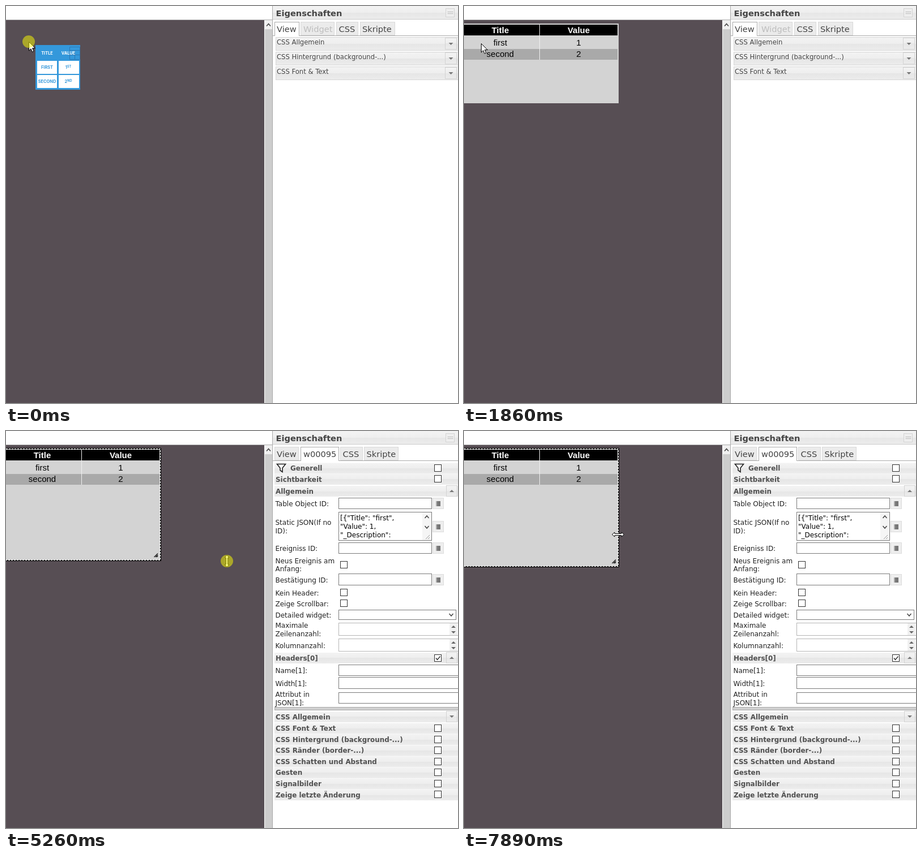
Recreate the animation shown at these times as an HTML page. Size 798 by 702 pixels, loop 8000 ms.

```html
<!DOCTYPE html>
<html lang="de">
<head>
<meta charset="utf-8">
<style>
  html, body { margin: 0; width: 100%; height: 100%; overflow: hidden; background: #fff; }
  svg { display: block; width: 798px; height: 702px; }
  text { white-space: pre; }
  .ui { font: 12px "DejaVu Sans", sans-serif; fill: #222; }
  .code { font: 12px "DejaVu Sans", sans-serif; fill: #000; }
  .bar { font: 11.6px "DejaVu Sans", sans-serif; fill: #444; }
  .bold { font: bold 11.9px "DejaVu Sans", sans-serif; fill: #505050; }
  .tab { font: 14.6px "DejaVu Sans", sans-serif; fill: #444; }
  .title { font: bold 14.6px "DejaVu Sans", sans-serif; fill: #444; }
  .cell { font: 15px "Liberation Sans", sans-serif; text-anchor: middle; }
  .icon { font: 700 7.4px Inter, sans-serif; text-anchor: middle; }
  .tag { font: 9px "Liberation Sans", sans-serif; }
</style>
</head>
<body>
<svg id="stage" viewBox="0 0 798 702"></svg>
<script>
const LOOP = 8000;
const stage = document.getElementById('stage');

const rect = (x, y, w, h, fill, stroke) => stroke
  ? `<rect x="${x + .5}" y="${y + .5}" width="${w - 1}" height="${h - 1}" fill="${fill}" stroke="${stroke}"/>`
  : `<rect x="${x}" y="${y}" width="${w}" height="${h}" fill="${fill}"/>`;
const text = (x, y, cls, str, extra = '') => `<text x="${x}" y="${y}" class="${cls}" ${extra}>${str}</text>`;
const path = (d, stroke, width = 1, fill = 'none', extra = '') =>
  `<path d="${d}" stroke="${stroke}" stroke-width="${width}" fill="${fill}" ${extra}/>`;
const group = (id, body) => `<g id="${id}">${body}</g>`;
const rows = (list, draw) => list.map(draw).join('');

const arrowButton = (y, up) => rect(777, y, 20, 20, 'url(#glass)', '#d3d3d3') +
  path(up ? `M783 ${y + 12}h8l-4 -4z` : `M783 ${y + 8}h8l-4 4z`, 'none', 0, '#777');
const checkbox = (x, y, on) => rect(x, y, 13, 13, '#fff', '#333') +
  (on ? path(`M${x + 3} ${y + 6.5}l2.5 3 5 -6`, '#222', 1.3) : '');
const pickButton = y => rect(753, y, 20, 20, '#eee', '#ddd') + rect(759, y + 6, 8, 9, '#777') +
  rect(759, y + 6, 2, 9, '#aaa');
const chevron = (x, y, dy) => path(`M${x - 3.5} ${y - dy}l3.5 ${2 * dy}l3.5 ${-2 * dy}`, '#444', 1.5);

function tabs(list) {
  return rect(471, 52, 327, 1, '#aaa') + rows(list, ([x, w, textX, label, state]) => {
    const active = state === 'active';
    return rect(x, 28, w, active ? 25 : 24, active ? '#fff' : '#ebebeb', active ? '#aaa' : '#d9d9d9') +
      (active ? rect(x + 1, 51, w - 2, 2, '#fff') : '') +
      text(textX, 45.5, 'tab', label, state === 'off' ? 'style="fill:#bdbdbd"' : '');
  });
}

function viewPanel() {
  const bars = ['CSS Allgemein', 'CSS Hintergrund (background-...)', 'CSS Font &amp; Text'];
  return tabs([[474, 44, 478, 'View', 'active'], [520, 60, 525, 'Widget', 'off'],
      [583, 39, 587.5, 'CSS'], [625, 62, 629, 'Skripte']]) +
    rows(bars, (label, i) => {
      const y = 55 + 26 * i;
      return rect(476, y, 324, 24, 'url(#glass)', '#d6d6d6') + text(478, y + 13, 'bar', label) +
        rect(775, y + 1, 21, 21, 'url(#glass)', '#d3d3d3') +
        path(`M781.5 ${y + 10}h8l-4 4z`, 'none', 0, '#777');
    });
}

function widgetPanel() {
  const header = (y, label, x = 476) => rect(474, y - 9, 324, 19, 'url(#glass)') + text(x, y + 4.5, 'bold', label);
  const label = (y, str) => text(475.5, y + 4.5, 'ui', str);
  const input = (y, h = 20, w = 165) => rect(587, y, w, h, '#fff', '#7a7a7a');
  const spinner = y => rect(587, y, 212, 23, '#fff', '#b5b5b5') + rect(783, y + 1, 14, 21, '#f0f0f0') +
    path(`M786 ${y + 9}h8l-4 -4z M786 ${y + 15}h8l-4 4z`, 'none', 0, '#666');
  const closed = ['CSS Font &amp; Text', 'CSS Hintergrund (background-...)', 'CSS Ränder (border-...)',
    'CSS Schatten und Abstand', 'Gesten', 'Signalbilder', 'Zeige letzte Änderung'];

  return tabs([[474, 43, 478, 'View'], [520, 68, 525, 'w00095', 'active'],
      [590, 40, 594.5, 'CSS'], [632, 61, 636.5, 'Skripte']]) +
    header(65.5, 'Generell', 502) + path('M478.5 58.5h15l-5.5 7v7l-4 -3v-4z', '#222', 1.6, '#fff') +
    header(85, 'Sichtbarkeit') + header(106, 'Allgemein') + arrowButton(96, true) +
    checkbox(756, 59) + checkbox(756, 78) +
    label(128, 'Table Object ID:') + input(118) + pickButton(118) +
    label(161, 'Static JSON(If no') + label(176, 'ID):') + input(143, 51) + pickButton(159) +
    rows(['[{"Title": "first",', '"Value": 1,', '"_Description":'], (s, i) => text(590, 158 + 15 * i, 'code', s)) +
    rect(735, 144, 16, 49, '#f5f5f5') + chevron(743, 152, -2) + chevron(743, 170, 2) +
    path('M741 191l7 -7M745 191l3 -3', '#999') +
    label(207, 'Ereigniss ID:') + input(197) + pickButton(197) +
    label(229, 'Neus Ereignis am') + label(243.5, 'Anfang:') + checkbox(590, 230) +
    label(263, 'Bestätigung ID:') + input(252, 21) + pickButton(253) +
    label(286, 'Kein Header:') + checkbox(590, 279) +
    label(305, 'Zeige Scrollbar:') + checkbox(590, 298) +
    label(325, 'Detailed widget:') + input(316, 18, 208) + chevron(786, 325, 2) +
    label(343.5, 'Maximale') + label(358, 'Zeilenanzahl:') + spinner(339) +
    label(379, 'Kolumnanzahl:') + spinner(367) +
    header(401, 'Headers[0]') + checkbox(756, 395, true) + arrowButton(391, true) +
    label(423.5, 'Name[1]:') + input(413, 20, 220) +
    label(446, 'Width[1]:') + input(435, 21, 220) +
    label(465, 'Attribut in') + label(480, 'JSON[1]:') + input(462, 20, 220) +
    rect(474, 488, 340, 6, '#d0d0d0', '#aaa') +
    header(505, 'CSS Allgemein') + arrowButton(495, false) +
    rows(closed, (name, i) => header(525.5 + 19.6 * i, name) + checkbox(756, Math.round(519 + 19.5 * i)));
}

function tableIcon() {
  const blue = '#3498db';
  const cell = (x, y, w) => rect(x, y, w, 23, '#fff');
  const ordinal = (n, suffix) => `${n}<tspan dy="-2.5" font-size="5.5">${suffix}</tspan>`;
  const put = (x, y, str, fill) => text(x, y, 'icon', str, `fill="${fill}"`);
  return rect(0, 0, 79, 79, blue) +
    cell(3, 28, 35) + cell(41, 28, 36) + cell(3, 53, 35) + cell(41, 53, 36) +
    path('M60.5 3.5h18v22h-18zM60.5 9.5h18M69.5 9.5v16M60.5 17.5h18', '#2c78b4') +
    put(20.5, 17, 'TITLE', '#fff') + put(58, 17, 'VALUE', '#fff') +
    put(20.5, 42, 'FIRST', blue) + put(20.5, 67, 'SECOND', blue) +
    put(58, 42, ordinal(1, 'ST'), blue) + put(58, 67, ordinal(2, 'ND'), blue);
}

function tableWidget() {
  const line = (y, left, right, fill) =>
    text(64, y, 'cell', left, `fill="${fill}"`) + text(202.5, y, 'cell', right, `fill="${fill}"`);
  const strip = (y, h, fill) => rect(0, y, 133, h, fill) + rect(134, y, 137, h, fill);
  const bold = s => `<tspan font-weight="bold">${s}</tspan>`;
  return '<rect id="body" y="31" width="273" fill="#d3d3d3"/>' +
    strip(33, 19, '#000') + rect(133, 33, 1, 62, '#f0f0f0') + strip(76, 19, '#a9a9a9') +
    line(47.5, bold('Title'), bold('Value'), '#fff') +
    line(70, 'first', '1', '#000') + line(90, 'second', '2', '#000') +
    group('select', '<path id="edge" stroke="#000" stroke-width="2" fill="none"/>' +
      '<path id="dash" stroke-dasharray="3 2" fill="none"/>') +
    group('grip', path('M261.5 0l6.5 -6.5M264 0l4 -4M266 0l2 -2', '#222', 1.4)) +
    group('tag', rect(0, 32, 40, 12, '#ff0') + text(-3.5, 41.5, 'tag', 'w00095'));
}

const doubleArrow = path('M0 -10.5L4 -6H1.5V6H4L0 10.5L-4 6H-1.5V-6H-4Z', '#000', 1, '#fff');
const pointer = path('M.5 .5V16L4 12.6L6.3 18.2L9 17L6.6 11.6H11.5Z', '#000', 1, '#fff');

stage.innerHTML = `<defs><linearGradient id="glass" x2="0" y2="1">
    <stop offset="0" stop-color="#f3f3f3"/><stop offset=".5" stop-color="#eee"/>
    <stop offset=".5" stop-color="#e6e6e6"/><stop offset="1" stop-color="#ececec"/>
  </linearGradient></defs>` +
  rect(0, 0, 798, 702, '#fff') + rect(0, 24, 470, 1, '#aaa') + rect(0, 25, 456, 677, '#574e54') +
  rect(457, 25, 13, 677, '#cdcdcd') + rect(457, 25, 13, 16, '#f0f0f0') + chevron(463.5, 33.5, -2) +
  rect(470, 0, 1, 702, '#aaa') +
  rect(471, 0, 327, 24, 'url(#glass)') + rect(471, 23, 327, 1, '#ccc') +
  text(476.5, 18, 'title', 'Eigenschaften') + rect(776, 4, 16, 16, '#eee', '#d3d3d3') +
  path('M780 10.5h9M780 13.5h9', '#888', 1, 'none', 'stroke-dasharray="1 1"') +
  group('view', viewPanel()) + group('props', widgetPanel()) +
  group('icon', tableIcon()) + group('table', tableWidget()) +
  group('cursor', group('pointer', pointer) + group('resize', doubleArrow) +
    '<circle id="press" r="11" fill="#ff0" opacity=".5"/>');

const el = Object.fromEntries([...stage.querySelectorAll('[id]')].map(e => [e.id, e]));

// Bursts of movement: first step, last step, number of steps.
const bursts = [[100, 760, 7], [1860, 2080, 3], [2300, 2610, 4], [2760, 3500, 8], [4050, 4050, 1],
  [4610, 4610, 1], [4910, 5580, 7], [5910, 6680, 8], [6800, 7340, 6], [7670, 7670, 1], [7890, 7890, 1]];

// Pointer route: time, x, y.
const route = [[0, 40, 63], [100, 36, 60], [430, 10, 38], [760, -6, 27], [1860, 30, 66], [2080, 94, 146],
  [2300, 122, 156], [2610, 221, 170.5], [2760, 228, 173], [3080, 262, 182], [3290, 276, 180], [3500, 274, 170],
  [4050, 268, 166], [4610, 269.5, 168], [4910, 284, 182], [5245, 390, 230], [5580, 420, 232],
  [5910, 422, 237], [6130, 422, 243], [6240, 414, 240], [6570, 329, 206], [6680, 293, 193],
  [6800, 288, 191], [7340, 273, 184], [7670, 272, 184], [7890, 272, 183]];

// Pointer shapes: start time, shape, resize angle.
const shapes = [[0, 'pointer'], [1530, 'none'], [1860, 'pointer'], [2500, 'resize', 0], [2760, 'pointer'],
  [3390, 'resize', 0], [4050, 'pointer'], [4610, 'resize', -45], [4910, 'resize', 0], [6230, 'pointer'],
  [7890, 'resize', 90]];

const latest = (list, t) => list.filter(item => item[0] <= t).pop();
const within = (t, from, to) => t >= from && t < to;
const show = (node, on) => node.setAttribute('display', on ? 'inline' : 'none');
const move = (node, x, y, angle = 0) =>
  node.setAttribute('transform', `translate(${x} ${y}) rotate(${angle})`);

function steppedTime(t) {
  const burst = latest(bursts, t);
  if (!burst) return 0;
  const [start, end, count] = burst;
  if (count === 1) return start;
  const gap = (end - start) / (count - 1);
  return start + gap * Math.min(count - 1, Math.floor((t - start) / gap + .15));
}

function pointerAt(t) {
  const time = steppedTime(t);
  const next = route.findIndex(key => key[0] > time);
  if (next < 0) return route[route.length - 1].slice(1);
  const [a, b] = [route[next - 1], route[next]];
  const k = (time - a[0]) / (b[0] - a[0]);
  return [1, 2].map(i => Math.round((a[i] + (b[i] - a[i]) * k) * 2) / 2);
}

function render(t) {
  const [x, y] = pointerAt(t);
  const [, shape, angle] = latest(shapes, t);

  show(el.view, t < 1970);
  show(el.props, t >= 1970);

  show(el.icon, t < 1630);
  if (t < 1200) move(el.icon, Math.round(x + 12), Math.round(y + 6));
  else move(el.icon, 2, 32);

  const dragged = Math.min(240, Math.max(172, Math.round(y - 1)));
  const bottom = t < 4910 ? 172 : t < 6230 ? dragged : 240;
  const hover = within(t, 4480, 4910);
  show(el.table, t >= 1630);
  show(el.select, t >= 1970);
  show(el.grip, t >= 1970);
  show(el.tag, hover);
  el.body.setAttribute('height', bottom - 31);
  el.edge.setAttribute('d', `M0 31H273V${bottom}H0`);
  el.dash.setAttribute('d', `M0 31.5H272.5V${bottom - .5}H0`);
  el.dash.setAttribute('stroke', hover ? '#ff0' : '#fff');
  move(el.grip, 0, bottom - 6);

  move(el.cursor, x, y);
  show(el.pointer, shape === 'pointer');
  show(el.resize, shape === 'resize');
  if (shape === 'resize') move(el.resize, 0, 0, angle);
  show(el.press, t < 1530 || within(t, 4910, 6230));
}

const begin = performance.now();
function tick() {
  render((performance.now() - begin) % LOOP);
  requestAnimationFrame(tick);
}
render(0);
requestAnimationFrame(tick);
</script>
</body>
</html>
```
